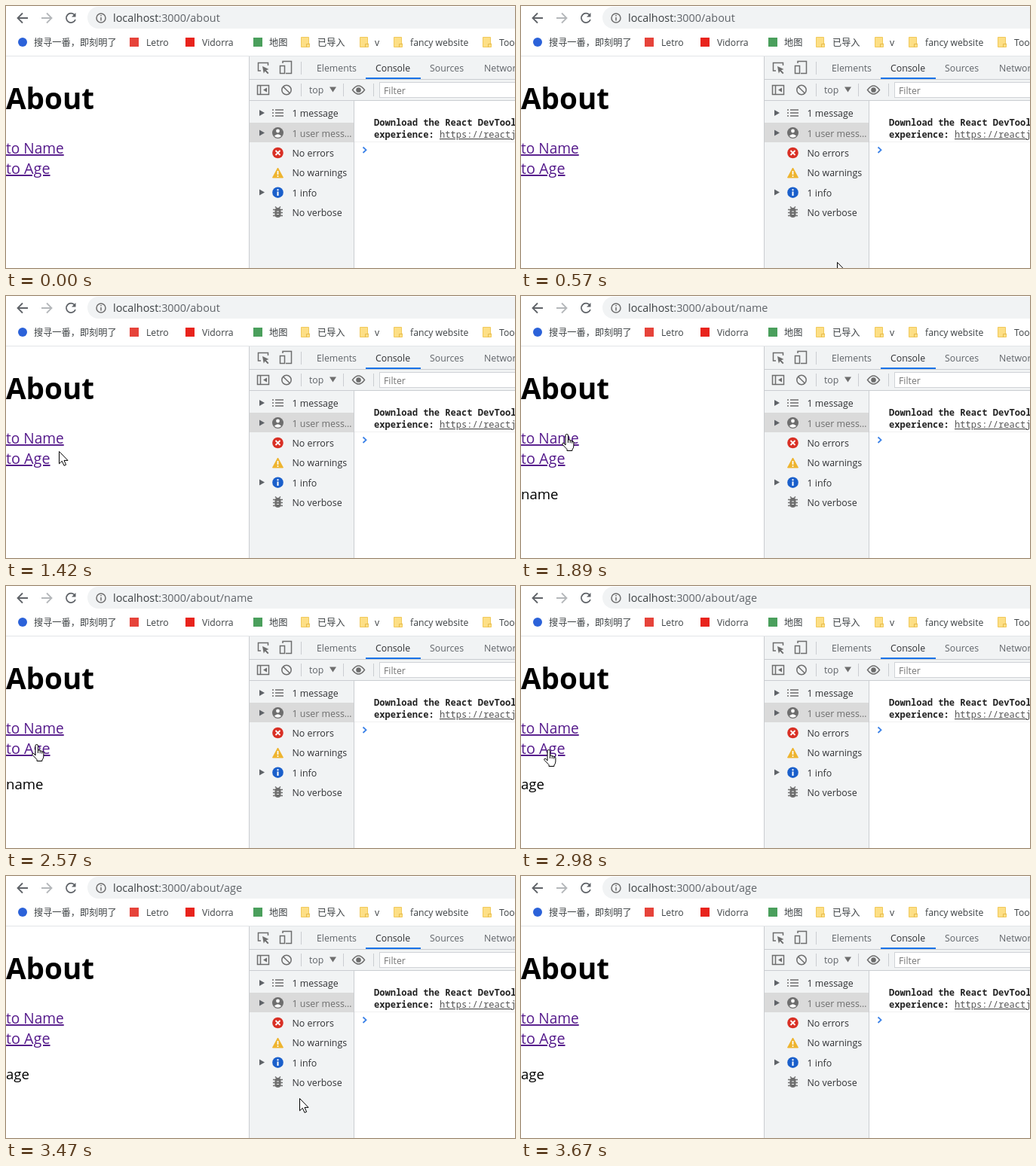
An HTML page that plays this animation: 675 by 348 pixels, repeating every 4.33 s.

```html
<!DOCTYPE html>
<html lang="zh-CN">
<head>
<meta charset="utf-8">
<title>Nested routes</title>
<style>
html, body { margin: 0; width: 100%; height: 100%; overflow: hidden; background: #fff }
svg { display: block; width: 675px; height: 348px; font: 12.4px "Open Sans", "Noto Sans CJK SC", sans-serif }
.bookmarks { font-size: 12.2px; fill: #3c4043 }
.tabs { font-size: 12.3px; fill: #5f6368 }
.side { fill: #303134 }
.mono { font: bold 12.08px "Noto Sans Mono", monospace; fill: #222 }
.link { fill: #551a8b; text-decoration: underline; text-decoration-thickness: 1.3px }
.line { fill: none; stroke: #6e6e6e; stroke-width: 1.5 }
.rule { fill: none; stroke: #cacdd1 }
</style>
</head>
<body>
<svg viewBox="0 0 675 348">
  <defs>
    <g id="folder">
      <path d="M.5 .5H10.5V9H11.5V13.5H.5Z" fill="#fddf85" stroke="#f0c95c"/>
      <path d="M7.5 13.5V9.5H11.5" fill="none" stroke="#e5b94a"/>
    </g>
    <path id="expand" d="M0-4L7 0L0 4Z" fill="#5f6368"/>
  </defs>
  <rect width="675" height="348" fill="#fff"/>

  <!-- browser toolbar -->
  <g fill="none" stroke="#5f6368" stroke-width="1.8">
    <path d="M29 16H16M22 9.5L15.5 16L22 22.5"/>
    <path d="M47 16H60M54 9.5L60.5 16L54 22.5" stroke="#b4b7ba"/>
    <path d="M91 12A6.2 6.2 0 1 0 92 18"/>
    <path d="M92.5 9V14.5H87Z" fill="#5f6368" stroke="none"/>
  </g>
  <rect x="108" y="1" width="620" height="29" rx="14.5" fill="#f1f3f4"/>
  <circle cx="126" cy="16" r="6" class="line" stroke-width="1.4"/>
  <path d="M126 12V13.6M126 15V19.5" class="line"/>
  <text x="142" y="21" font-size="14.4" fill="#3c4043">localhost<tspan fill="#5f6368">:3000/about<tspan id="route"></tspan></tspan></text>

  <!-- bookmarks -->
  <circle cx="22" cy="48" r="6" fill="#2b62d9"/>
  <rect x="164" y="42" width="12" height="12" fill="#e6433a"/>
  <rect x="238" y="42" width="12" height="12" fill="#e8231c"/>
  <rect x="328" y="42" width="12" height="12" fill="#4a9f5c"/>
  <use href="#folder" x="391" y="41"/>
  <use href="#folder" x="469" y="41"/>
  <use href="#folder" x="514" y="41"/>
  <use href="#folder" x="632" y="41"/>
  <g class="bookmarks">
    <text x="37" y="52.5">搜寻一番，即刻明了</text>
    <text x="186" y="52.5">Letro</text>
    <text x="260" y="52.5">Vidorra</text>
    <text x="349" y="52.5">地图</text>
    <text x="413" y="52.5">已导入</text>
    <text x="489" y="52.5">v</text>
    <text x="536" y="52.5">fancy website</text>
    <text x="654" y="52.5">Tools</text>
  </g>
  <path d="M0 66.5H675" stroke="#e3e5e8"/>

  <!-- page -->
  <text y="137" font-size="38.6" font-weight="700">About</text>
  <text class="link" y="196" font-size="19.1">to Name</text>
  <text class="link" y="223" font-size="19.8">to Age</text>
  <text id="content" y="270" font-size="18.6"></text>

  <!-- developer tools -->
  <path d="M322 67H675V126H462V348H322Z" fill="#f1f3f4"/>
  <rect x="323" y="155" width="138" height="26" fill="#dadada"/>
  <path class="rule" d="M322.5 67V348M323 97.5H675M323 125.5H675M461.5 126V348M391.5 74V91M391.5 103V120M447.5 103V120M487.5 103V120"/>
  <rect x="495.5" y="101.5" width="200" height="20" fill="#fff" stroke="#d0d3d7"/>
  <path d="M477 96H550" stroke="#1a73e8" stroke-width="2"/>
  <g class="tabs">
    <text x="412" y="87">Elements</text>
    <text x="490" y="87" fill="#303134">Console</text>
    <text x="562" y="87">Sources</text>
    <text x="634" y="87">Network</text>
    <text x="402" y="115.5">top</text>
    <text x="501" y="116.5" fill="#757575">Filter</text>
  </g>
  <path d="M429 107.5H438L433.5 114.5Z" fill="#6e6e6e"/>
  <g class="line">
    <path d="M338 86H334.5V75.5H347.5V79"/>
    <path d="M340 80L348.5 84L345 85.3L348.5 89L347 90.3L343.5 86.6L341.8 89.5Z" fill="#6e6e6e" stroke="none"/>
    <path d="M367 76V73.5H378.5V89.5H371M363.5 79.5H369.5V89.5H363.5Z"/>
    <path d="M333.5 105.5H348.5V117.5H333.5ZM337.5 105V118"/>
    <path d="M346 108.5V114.5L341 111.5Z" fill="#6e6e6e" stroke="none"/>
    <circle cx="372" cy="111.5" r="6.2"/>
    <path d="M367.7 107.2L376.3 115.8"/>
    <path d="M459.5 111.5Q467.5 100.5 475.5 111.5Q467.5 122.5 459.5 111.5Z"/>
    <circle cx="467.5" cy="111.5" r="2.6" fill="#6e6e6e"/>
  </g>

  <!-- message sidebar -->
  <use href="#expand" x="336" y="142"/>
  <use href="#expand" x="336" y="168.5"/>
  <use href="#expand" x="336" y="247.5"/>
  <path class="line" d="M357 138H368M357 142H368M357 146H368M353 138H355M353 142H355M353 146H355"/>
  <circle cx="360.5" cy="168.5" r="7.5" fill="#6e6e6e"/>
  <circle cx="360.5" cy="166" r="2.4" fill="#fff"/>
  <path d="M355.8 172.8Q360.5 167.5 365.2 172.8Q360.5 176.5 355.8 172.8Z" fill="#fff"/>
  <circle cx="360.5" cy="195" r="7.3" fill="#d93025"/>
  <path d="M357.5 192L363.5 198M363.5 192L357.5 198" stroke="#fff" stroke-width="1.8"/>
  <path d="M360.5 215L367.5 228H353.5Z" fill="#eeb42e" stroke="#eeb42e" stroke-linejoin="round"/>
  <path d="M360.5 219V224M360.5 225.2V227" stroke="#fff" stroke-width="1.7"/>
  <circle cx="360.5" cy="247.7" r="7.3" fill="#1a5fcb"/>
  <path d="M360.5 243.2V245.2M360.5 246.6V252" stroke="#fff" stroke-width="2"/>
  <rect x="356.5" y="268" width="8" height="13" rx="4" fill="#6e6e6e"/>
  <path class="line" d="M354 270.5H367M354 274.5H367M354 278.5H367M357 266.5L359.5 269M364 266.5L361.5 269"/>
  <path d="M359 273H362M359 276.5H362" stroke="#f1f3f4" stroke-width="1.2"/>
  <g class="side">
    <text x="379.5" y="147">1 message</text>
    <text x="379.5" y="173.5" fill="#6e6e6e">1 user mess…</text>
    <text x="379.5" y="199.5">No errors</text>
    <text x="379.5" y="226">No warnings</text>
    <text x="379.5" y="252.5">1 info</text>
    <text x="379.5" y="279">No verbose</text>
  </g>

  <!-- console -->
  <g class="mono">
    <text x="488" y="159">Download the React DevTools</text>
    <text x="488" y="175">experience: <tspan fill="#555" font-weight="400" text-decoration="underline">https://reactjs</tspan></text>
  </g>
  <path d="M462 180.5H675" stroke="#f0f0f0"/>
  <path d="M473.5 187.5L477.5 191.2L473.5 195" fill="none" stroke="#3b82e8" stroke-width="1.8"/>

  <g id="pointer" fill="#fff" stroke="#000" stroke-linejoin="round">
    <path id="arrow" d="M.5 .5V16.8L4.3 13.3L7 19.3L9.6 18.2L7 12.4H12Z"/>
    <path id="hand" transform="translate(-5)" d="M5 15V2.2a1.7 1.7 0 0 1 3.4 0V8q2.5-.9 2.8 1q2-.8 2.5 1q2-.4 2.2 1.3V16q0 3-2 5V22.5H7V20.5L1.2 14.5q-1.2-1.8 .4-2.4Q3 11.8 5 15ZM8.4 8V12M11.2 9V12.3M13.7 10V12.6"/>
  </g>
</svg>
<script>
const LOOP = 4330, START = 508, STEP = 68.4;
const NAME_CLICK = 18, AGE_CLICK = 36, LAST = 45;
// step, x, y of the pointer's hot spot
const path = [
  [0, 419, 340], [6, 250, 297], [7, 208, 297], [10, 118, 243], [13, 70, 206],
  [14, 64, 203], [15, 59, 190], [17, 59, 183], [25, 59, 183], [30, 39, 210],
  [31, 39, 210], [33, 35, 217], [37, 35, 217], [39, 55, 232], [40, 83, 243],
  [41, 193, 258], [44, 487, 314], [LAST, 545, 337]
];
const $ = id => document.getElementById(id);
const show = (el, on) => el.setAttribute("display", on ? "inline" : "none");

function pointerAt(step) {
  const i = Math.max(1, path.findIndex(p => p[0] >= step));
  const [s0, x0, y0] = path[i - 1], [s1, x1, y1] = path[i];
  const k = (step - s0) / (s1 - s0);
  return [x0 + (x1 - x0) * k, y0 + (y1 - y0) * k];
}

function draw(now) {
  const step = Math.floor((now % LOOP - START) / STEP);
  const page = step >= AGE_CLICK ? "age" : step >= NAME_CLICK ? "name" : "";
  $("route").textContent = page && "/" + page;
  $("content").textContent = page;

  const visible = step >= 0 && step <= LAST;
  show($("pointer"), visible);
  if (visible) {
    const [x, y] = pointerAt(step).map(Math.round);
    const overLink = y > 176 && y < 203 && x < 77 || y >= 203 && y < 230 && x < 60;
    $("pointer").setAttribute("transform", `translate(${x} ${y})`);
    show($("hand"), overLink);
    show($("arrow"), !overLink);
  }
}

const begin = performance.now();
(function tick() {
  draw(performance.now() - begin);
  requestAnimationFrame(tick);
})();
</script>
</body>
</html>
```
